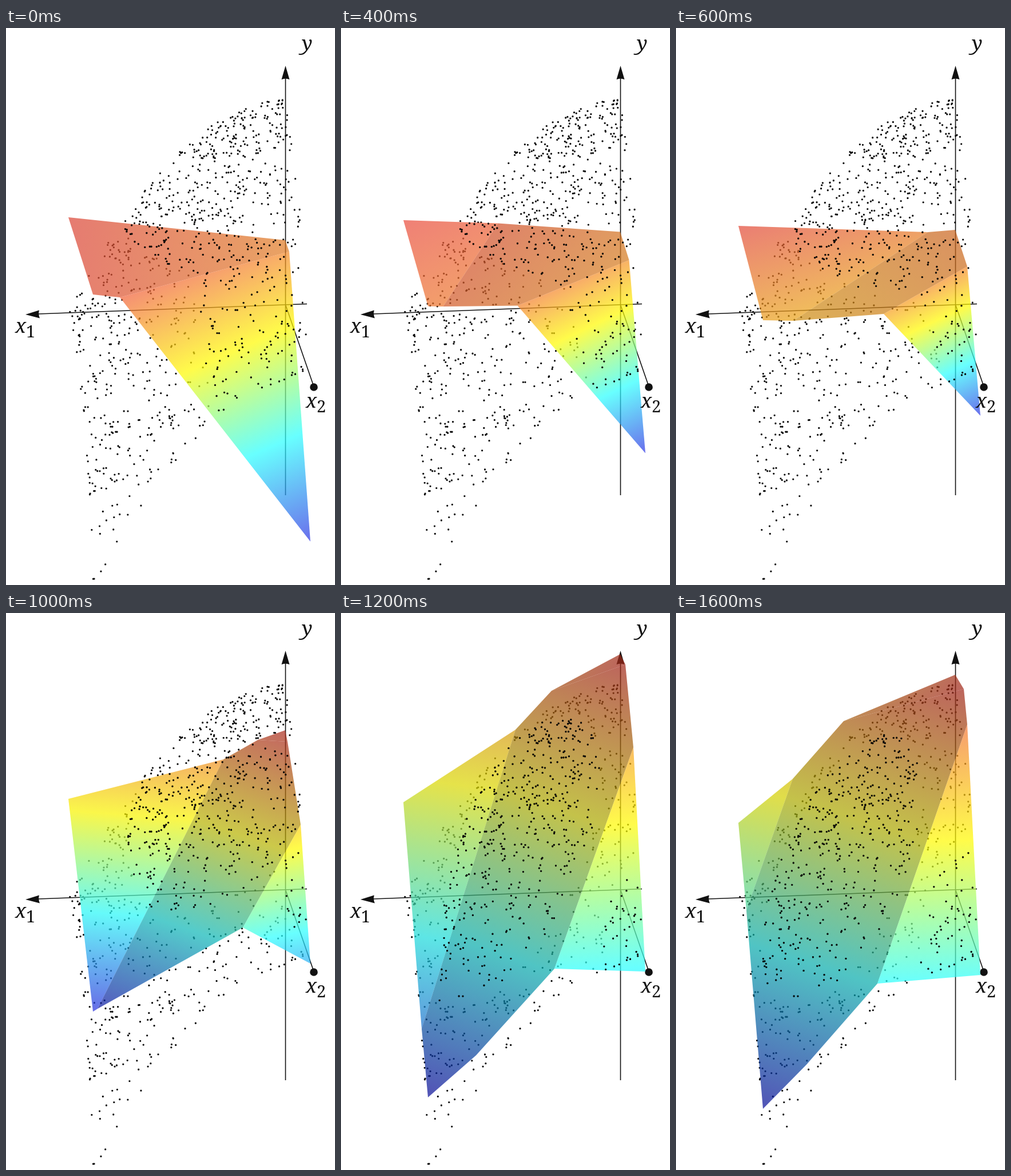
An HTML page with a canvas for the animation above (1.8 s loop, 575 by 974 pixels).

```html
<!DOCTYPE html>
<html lang="en">
<head>
<meta charset="utf-8">
<title>Piecewise linear surface fit</title>
<style>
html, body { margin: 0; width: 100%; height: 100%; overflow: hidden; background: #fff; }
canvas { display: block; width: 575px; height: 974px; }
</style>
</head>
<body>
<canvas id="stage" width="575" height="974"></canvas>
<script>
const ctx = document.getElementById('stage').getContext('2d');
const STEP = 200, STEPS = 9, ALPHA = 0.71, INK = '#111';
const OX = 488, OY = 484; // screen position of the axes' origin

// step, corner heights A B C D, hinge ends T S R0 R P Q, sag, shades of left and middle facet
const KEYS = [
  [0, 331, 371, 898, 466, 109, 331, 488, 371, 488, 371, 495, 391, 199, 471, 152, 466, 0, 1, .94],
  [1, 326, 360, 809, 462, 109, 326, 488, 360, 488, 360, 498, 395, 254, 471, 152, 462, 0, 1, .93],
  [3, 346, 353, 678, 511, 440, 357, 488, 353, 488, 353, 509, 417, 363, 500, 205, 512, 0, .96, .88],
  [5, 325, 205, 613, 697, 380, 256, 440, 222, 492, 225, 515, 370, 414, 550, 160, 692, 0, .98, .8],
  [6, 331, 72, 627, 847, 305, 204, 368, 136, 497, 90, 511, 235, 373, 622, 141, 727, 12, .9, .77],
  [8, 367, 108, 633, 867, 204, 290, 293, 189, 503, 133, 509, 195, 352, 648, 123, 520, 6, .88, .77]
];

function poseAt(step) {
  const i = Math.max(1, KEYS.findIndex(k => k[0] >= step));
  const a = KEYS[i - 1], b = KEYS[i], f = (step - a[0]) / (b[0] - a[0]);
  return a.map((n, j) => n + (b[j] - n) * f).slice(1);
}

function seeded(s) {
  return () => {
    s = s + 0x6D2B79F5 | 0;
    let t = Math.imul(s ^ s >>> 15, 1 | s);
    t = t + Math.imul(t ^ t >>> 7, 61 | t) ^ t;
    return ((t ^ t >>> 14) >>> 0) / 4294967296;
  };
}

// samples of a downward paraboloid over the unit square
const rand = seeded(29);
const dots = Array.from({ length: 1000 }, () => {
  const u = rand(), v = rand(), z = 359 * (1 - u * u - v * v);
  return { x: OX - 379 * u + 44 * v, y: OY + 14 * u + 126 * v - z, z };
});

// surface point from its screen place and depth v
function pt(x, y, v) {
  const u = (OX + 44 * v - x) / 379;
  return { x, y, z: OY + 14 * u + 126 * v - y };
}

function buildFacets(pose) {
  const [a, b, c, d, tx, ty, sx, sy, r0x, r0y, rx, ry, px, py, qx, qy, sag, shadeL, shadeM] = pose;
  const onSide = qx < 152;
  const A = pt(109, a, 0), B = pt(OX, b, 0), C = pt(532, c, 1), D = pt(152, d, 1);
  const T = pt(tx, ty, 0), S = pt(sx, sy, 0);
  const R0 = pt(r0x, r0y, (r0x - OX) / 44), R = pt(rx, ry, (rx - OX) / 44);
  const P = pt(px, py, 1), Q = pt(qx, qy, onSide ? (qx - 109) / 43 : 1);
  const E = onSide ? D : Q;
  const K = pt(P.x + .62 * (E.x - P.x), P.y + .62 * (E.y - P.y) + sag, 1);
  return [
    { poly: onSide ? [A, T, Q] : [A, T, Q, D], plane: [A, T, Q], shade: shadeL },
    { poly: [T, S, R0, R, P, K, E, Q], plane: [T, R, P], shade: shadeM },
    { poly: [S, B, R0], plane: [S, B, R0], shade: shadeM },
    { poly: [R, C, P], plane: [R, C, P], shade: 1 }
  ];
}

// height as a linear function of screen position
function planeOf([p, q, r]) {
  const x1 = q.x - p.x, y1 = q.y - p.y, z1 = q.z - p.z;
  const x2 = r.x - p.x, y2 = r.y - p.y, z2 = r.z - p.z;
  const det = x1 * y2 - x2 * y1;
  if (Math.abs(det) < 20) return null;
  const gx = (z1 * y2 - z2 * y1) / det, gy = (x1 * z2 - x2 * z1) / det;
  return { p, gx, gy, z: o => p.z + gx * (o.x - p.x) + gy * (o.y - p.y) };
}

const RAMP = [[0, 45, 50, 228], [.33, 42, 255, 255], [.66, 255, 250, 0], [1, 240, 80, 65]];

function rampFill({ p, gx, gy }, lo, hi, shade) {
  const n = gx * gx + gy * gy;
  const at = z => [p.x + gx * (z - p.z) / n, p.y + gy * (z - p.z) / n];
  const g = ctx.createLinearGradient(...at(lo), ...at(hi));
  for (const [stop, ...rgb] of RAMP) {
    // shade the blended tone, so the white backing darkens too
    const tone = rgb.map(c => {
      const seen = (c * ALPHA + 255 * (1 - ALPHA)) * shade;
      return Math.max(0, Math.round((seen - 255 * (1 - ALPHA)) / ALPHA));
    });
    g.addColorStop(stop, `rgba(${tone},${ALPHA})`);
  }
  return g;
}

function outline(pts) {
  const path = new Path2D();
  pts.forEach((p, i) => i ? path.lineTo(p.x, p.y) : path.moveTo(p.x, p.y));
  path.closePath();
  return path;
}

function drawDots(list) {
  ctx.fillStyle = '#0a0a0a';
  ctx.beginPath();
  for (const { x, y } of list) {
    ctx.moveTo(x + 1.65, y);
    ctx.arc(x, y, 1.65, 0, 7);
  }
  ctx.fill();
}

function drawAxes() {
  ctx.strokeStyle = ctx.fillStyle = INK;
  ctx.lineWidth = 1.6;
  ctx.stroke(new Path2D('M488.5 817V85M526 482.5L50 500.3M488.5 484L538 627'));
  ctx.fill(new Path2D('M488.5 66L495.5 90Q488.5 87 481.5 90Z'));
  ctx.fill(new Path2D('M34 501L58 493.5Q56 500 59 507.5Z'));
  ctx.beginPath();
  ctx.arc(538, 628, 6.8, 0, 7);
  ctx.fill();
}

function label(text, x, y, font) {
  ctx.font = font + 'px "Noto Serif", "Liberation Serif", serif';
  ctx.fillText(text, x, y);
}

function drawLabels() {
  ctx.fillStyle = INK;
  label('y', 517, 39, 'italic 35');
  label('x', 16, 533, 'italic 35');
  label('1', 35, 541, '29');
  label('x', 524, 664, 'italic 35');
  label('2', 543, 672, '29');
}

function draw(step) {
  ctx.clearRect(0, 0, 575, 974);
  drawAxes();
  drawDots(dots);
  const facets = buildFacets(poseAt(step));
  const heights = facets.flatMap(f => f.poly.map(p => p.z));
  const lo = Math.min(...heights), hi = Math.max(...heights);
  const front = [];
  for (const { poly, plane, shade } of facets) {
    const surf = planeOf(plane);
    if (!surf) continue;
    const path = outline(poly);
    ctx.fillStyle = rampFill(surf, lo, hi, shade);
    ctx.fill(path);
    front.push(...dots.filter(o => o.z > surf.z(o) && ctx.isPointInPath(path, o.x, o.y)));
  }
  drawDots(front);
  drawLabels();
}

let shown = -1;
function tick() {
  const step = Math.floor(performance.now() / STEP) % STEPS;
  if (step !== shown) draw(shown = step);
  requestAnimationFrame(tick);
}
tick();
</script>
</body>
</html>
```
